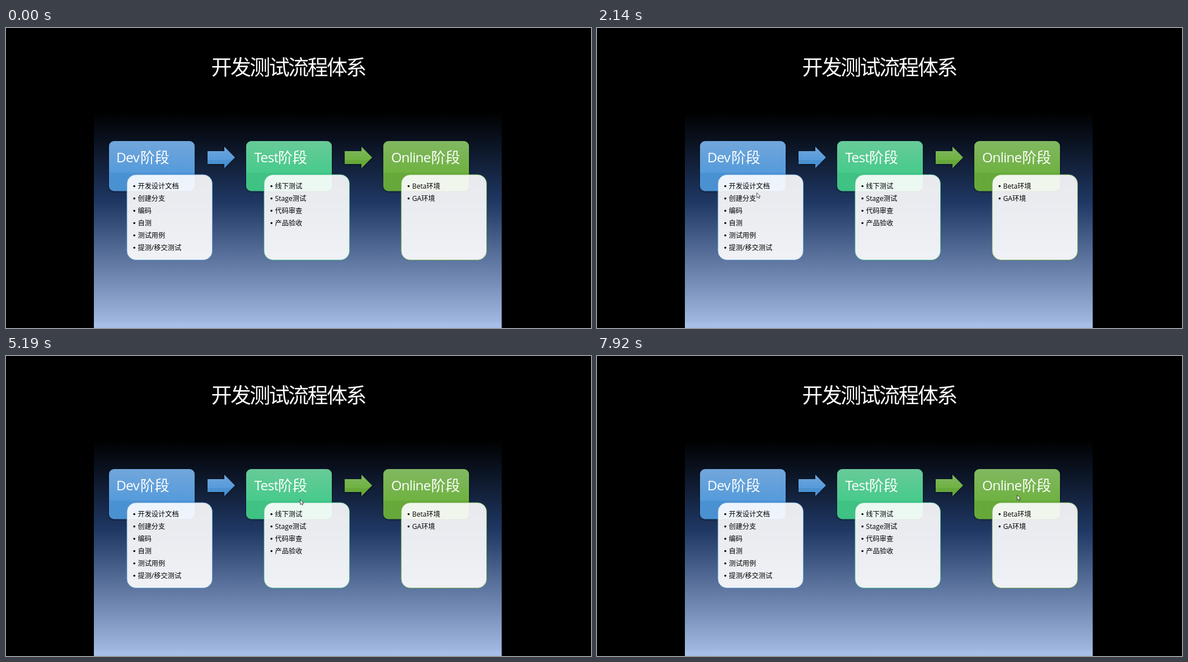
An HTML page for the animation above (8000 ms loop, 1045 px wide and 536 px high).

```html
<!DOCTYPE html>
<html lang="zh-CN">
<head>
<meta charset="utf-8">
<style>
html, body { margin: 0; width: 100%; height: 100%; overflow: hidden; background: #000; }
svg { display: block; }
text { font-family: "Open Sans", "Noto Sans CJK SC", "Noto Sans CJK", sans-serif; white-space: pre; }
.title { font-size: 37px; letter-spacing: -2.6px; font-weight: 350; fill: #fff; }
.head { font-size: 24.5px; letter-spacing: -.8px; fill: #fff; }
.cjk { font-size: 26px; letter-spacing: 0; font-weight: 350; }
.item { font-size: 12.2px; }
.box { filter: drop-shadow(0 1.5px 1.5px rgba(0, 0, 0, .5)); }
</style>
</head>
<body>
<svg width="1045" height="536" viewBox="0 0 1045 536">
  <defs>
    <linearGradient id="sky" x2="0" y2="1">
      <stop offset="0" stop-color="#000"/>
      <stop offset=".42" stop-color="#1f3864"/>
      <stop offset=".975" stop-color="#a1b8e0"/>
      <stop offset=".976" stop-color="#a8bee6"/>
      <stop offset="1" stop-color="#a8bee6"/>
    </linearGradient>
  </defs>
  <rect width="1045" height="536"/>
  <rect x="157" y="150" width="728.5" height="386" fill="url(#sky)"/>
  <text class="title" x="366.5" y="83.5">开发测试流程体系</text>
  <g id="stages"></g>
  <path id="cursor" d="M.5 .5V9.4L2.6 7.5 4 10.6 5.4 10 4.1 7H6.9Z" fill="#fff" stroke="#222" stroke-width=".8"/>
</svg>
<script>
const stages = [
  { x: 184, latin: 'Dev', textX: 197, cjkX: 239.7, colors: ['#71a6db', '#559bdb', '#4a91d2'], line: '#5b9bd5',
    items: ['开发设计文档', '创建分支', '编码', '自测', '测试用例', '提测/移交测试'] },
  { x: 429, latin: 'Test', textX: 443.5, cjkX: 486, colors: ['#68ca98', '#47cb8c', '#3fc284'], line: '#43c188',
    items: ['线下测试', 'Stage测试', '代码审查', '产品验收'] },
  { x: 674, latin: 'Online', textX: 688, cjkX: 759.3, colors: ['#81b861', '#6fb241', '#66a83a'], line: '#70ad47',
    items: ['Beta环境', 'GA环境'] }
];

const gradient = (id, [top, mid, low]) => `<linearGradient id="${id}" x2="0" y2="1">
  <stop offset="0" stop-color="${top}"/><stop offset=".63" stop-color="${mid}"/>
  <stop offset=".635" stop-color="${low}"/><stop offset="1" stop-color="${low}"/></linearGradient>`;

const item = (x, text, i) => {
  const y = 282.3 + 22 * i;
  return `<circle cx="${x + 45.2}" cy="${y + .3}" r="1.8"/>
    <text class="item" x="${x + 51.5}" y="${y + 4.6}">${text}</text>`;
};

const arrow = (x, fill) =>
  `<path class="box" fill="${fill}" d="M${x} 220H${x + 30}V212L${x + 49} 231.2 ${x + 30} 250.5V243H${x}Z"/>`;

document.getElementById('stages').innerHTML = stages.map((s, i) => `
  ${gradient('fill' + i, s.colors)}
  <rect class="box" x="${s.x}" y="202" width="153" height="89.5" rx="9" fill="url(#fill${i})"/>
  <text class="head" x="${s.textX}" y="240">${s.latin}<tspan class="cjk" x="${s.cjkX}" y="241.3">阶段</tspan></text>
  <rect x="${s.x + 32}" y="262" width="152.5" height="152.5" rx="16" fill="#fff" fill-opacity=".9" stroke="${s.line}" stroke-width=".8"/>
  ${s.items.map((text, n) => item(s.x, text, n)).join('')}
  ${i < 2 ? arrow(s.x + 176, `url(#fill${i * 2})`) : ''}`).join('');

// Pointer path: time, x, y
const path = [
  [200, 735, 495], [560, 448, 412], [660, 455, 420], [960, 455, 420], [1130, 479, 450], [1270, 473, 450],
  [1820, 217, 250], [1910, 235, 219], [2140, 285, 294], [2440, 221, 243], [2570, 250, 214],
  [2800, 304, 285], [2930, 302, 353], [3232, 286, 385], [4100, 286, 385],
  [4780, 465, 207], [4950, 499, 225], [5190, 524, 256], [5430, 441, 240], [5540, 470, 205],
  [5820, 549, 303], [6200, 630, 353], [6660, 764, 317], [6780, 789, 280], [7010, 748, 211],
  [7133, 725, 239], [7400, 786, 260], [7620, 755, 207], [7750, 725, 232], [7920, 750, 248], [8000, 750, 248]
];

const same = (a, b) => a[1] === b[1] && a[2] === b[2];

function slope(i, k) {
  const a = path[i - 1], p = path[i], b = path[i + 1];
  if (!a || !b || same(a, p) || same(p, b)) return 0;
  return (b[k] - a[k]) / (b[0] - a[0]);
}

// Cubic Hermite curve through the path points
function pointer(t) {
  let i = 0;
  while (i < path.length - 2 && t >= path[i + 1][0]) i++;
  const a = path[i], b = path[i + 1], d = b[0] - a[0];
  const u = Math.max(0, Math.min(1, (t - a[0]) / d)), v = 1 - u;
  return [1, 2].map(k => Math.round(
    v * v * (1 + 2 * u) * a[k] + u * u * (3 - 2 * u) * b[k] +
    d * u * v * (v * slope(i, k) - u * slope(i + 1, k))));
}

const cursor = document.getElementById('cursor');
const LOOP = 8000, STEP = 78.1, ANCHOR = 1280;
const start = performance.now();

function draw(now) {
  const t = Math.max(0, now - start) % LOOP;
  const held = ANCHOR + Math.floor((t - ANCHOR) / STEP + .25) * STEP;
  cursor.setAttribute('visibility', t < 200 ? 'hidden' : 'visible');
  cursor.setAttribute('transform', `translate(${pointer(held)})`);
  requestAnimationFrame(draw);
}
draw(start);
</script>
</body>
</html>
```
